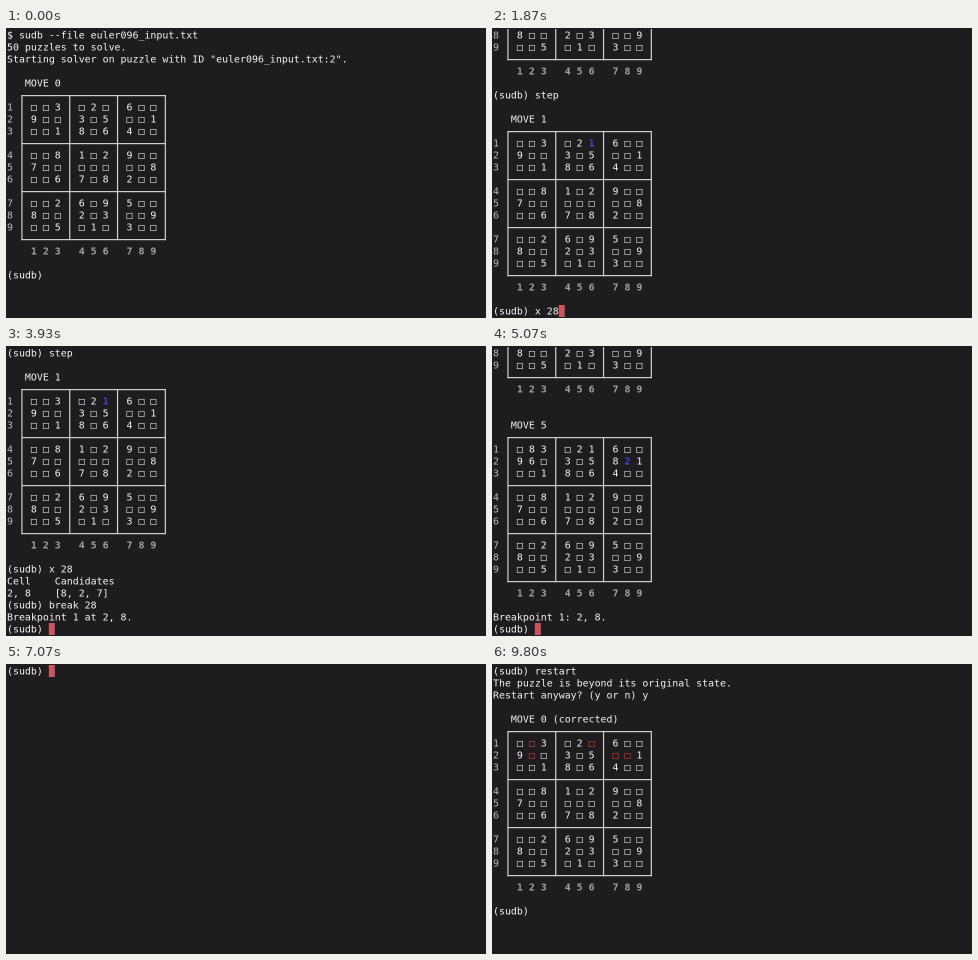
Animation of 480 by 290 pixels, one loop 9.99 s. Source, as an HTML page with a canvas:

```html
<!DOCTYPE html>
<html lang="en">
<head>
<meta charset="utf-8">
<title>Sudoku debugger session</title>
<style>
  html, body { margin: 0; width: 100%; height: 100%; overflow: hidden; background: #1e1c1f; }
  canvas { display: block; }
</style>
</head>
<body>
<canvas id="term" width="480" height="290"></canvas>
<script>
const LOOP = 9990, WIDTH = 480, HEIGHT = 290, ROWS = 24, PAD = 1;
const CELL_W = (WIDTH - 2 * PAD) / 80, CELL_H = (HEIGHT - 2 * PAD) / ROWS;
const BASELINE = 9.46, RULE_WIDTH = 1.2, OVERSAMPLE = 2;
const FONT = '9.92px "DejaVu Sans Mono", monospace';
const COLOR = {
  bg: '#1e1c1f', text: '#f4f4f4', label: '#bcbcbc', axis: '#a2a2a2',
  rule: '#d0d0d0', move: '#4a40d8', undo: '#cc4844', cursor: '#c9565c'
};
const PROMPT = '(sudb) ';
const PUZZLE = [
  '..3.2.6..', '9..3.5..1', '..18.64..',
  '..81.29..', '7.......8', '..67.82..',
  '..26.95..', '8..2.3..9', '..5.1.3..'
];
// Each move is row, column, digit, counted from 1.
const MOVES = [[1, 6, 1], [2, 7, 8], [1, 2, 8], [2, 2, 6], [2, 8, 2]];

const columnOf = i => 4 + 2 * i + 2 * Math.floor(i / 3);
const span = (col, text, color = COLOR.text, bold = false) => ({ col, text, color, bold });
const textLine = text => ({ spans: [span(0, text)] });

// Terminal model: a growing list of lines and timed snapshots of its tail.
let lines = [];
const states = [];

const snap = (time, cursor = true) =>
  states.push({ time, cursor, rows: lines.slice(-ROWS) });
const print = (...texts) => lines.push(...texts.map(textLine));

function type(time, text, prompt = PROMPT) {
  lines[lines.length - 1] = textLine(prompt + text);
  snap(time);
}

function printGrid(title, moveCount, marked, markColor) {
  const cells = PUZZLE.map(row => [...row]);
  MOVES.slice(0, moveCount).forEach(([r, c, digit]) => cells[r - 1][c - 1] = String(digit));
  const isMarked = (r, c) => marked.some(m => m[0] === r + 1 && m[1] === c + 1);

  print('', '   ' + title);
  cells.forEach((row, r) => {
    if (r % 3 === 0) lines.push({ spans: [], rule: r ? 'middle' : 'top' });
    const spans = row.map((cell, c) => {
      const hit = isMarked(r, c);
      const glyph = cell === '.' ? '□' : cell;
      return span(columnOf(c), glyph, hit ? markColor : COLOR.text, hit && cell !== '.');
    });
    lines.push({ spans: [span(0, String(r + 1), COLOR.label), ...spans], rule: 'bars' });
  });
  lines.push({ spans: [], rule: 'bottom' });
  lines.push({ spans: cells.map((_, i) => span(columnOf(i), String(i + 1), COLOR.axis, true)) });
  print('');
}

const printMove = n => printGrid('MOVE ' + n, n, [MOVES[n - 1]], COLOR.move);

function buildSession() {
  print('$ sudb --file euler096_input.txt', '50 puzzles to solve.',
    'Starting solver on puzzle with ID "euler096_input.txt:2".');
  printGrid('MOVE 0', 0, []);
  print(PROMPT);
  snap(0, false);
  snap(70);

  type(200, 's');
  type(470, 'step');
  printMove(1);
  print(PROMPT);
  snap(800);

  type(1130, 'x');
  type(1530, 'x ');
  type(1670, 'x 2');
  type(1800, 'x 28');
  print('Cell    Candidates', '2, 8    [8, 2, 7]', PROMPT);
  snap(2200);

  type(2530, 'b');
  type(2870, 'break ');
  type(3270, 'break 2');
  type(3400, 'break 28');
  print('Breakpoint 1 at 2, 8.', PROMPT);
  snap(3930);

  type(4130, 'f');
  type(4470, 'finish ');
  [2, 3, 4, 5].forEach(printMove);
  print('Breakpoint 1: 2, 8.', PROMPT);
  snap(5000);

  type(5330, 'e');
  type(5600, 'explain ');
  snap(6200, false);
  printMove(5);
  print(PROMPT);
  snap(6270);

  lines = [];
  print(PROMPT);
  snap(7070);

  type(7270, 'r');
  type(7400, 're');
  type(7530, 'res');
  type(7670, 'restart ');
  const question = 'Restart anyway? (y or n) ';
  print('The puzzle is beyond its original state.', question);
  snap(8130);
  type(8470, 'y', question);
  printGrid('MOVE 0 (corrected)', 0, MOVES, COLOR.undo);
  print(PROMPT);
  snap(8930);
  snap(9470, false);
}

// The terminal is drawn oversampled and scaled down for soft edges.
const screen = document.getElementById('term').getContext('2d');
const buffer = document.createElement('canvas');
buffer.width = WIDTH * OVERSAMPLE;
buffer.height = HEIGHT * OVERSAMPLE;
const ctx = buffer.getContext('2d');
ctx.scale(OVERSAMPLE, OVERSAMPLE);

const cellX = col => PAD + col * CELL_W;
const cellY = row => PAD + row * CELL_H;

function drawRule(kind, top) {
  const middle = CELL_H / 2;
  const from = kind === 'top' ? middle : 0;
  const to = kind === 'bottom' ? middle + RULE_WIDTH : CELL_H;
  const barX = i => cellX(2.5 + 8 * i) - RULE_WIDTH / 2;
  ctx.fillStyle = COLOR.rule;
  for (let i = 0; i < 4; i++) ctx.fillRect(barX(i), top + from, RULE_WIDTH, to - from);
  if (kind !== 'bars') ctx.fillRect(barX(0), top + middle, barX(3) - barX(0) + RULE_WIDTH, RULE_WIDTH);
}

function drawSpan({ col, text, color, bold }, top) {
  ctx.font = (bold ? 'bold ' : '') + FONT;
  ctx.fillStyle = color;
  [...text].forEach((ch, i) => {
    if (ch !== ' ') ctx.fillText(ch, cellX(col + i), top + BASELINE);
  });
}

function drawState({ rows, cursor }) {
  ctx.fillStyle = COLOR.bg;
  ctx.fillRect(0, 0, WIDTH, HEIGHT);
  rows.forEach((line, r) => {
    if (line.rule) drawRule(line.rule, cellY(r));
    line.spans.forEach(s => drawSpan(s, cellY(r)));
  });
  if (cursor) {
    const row = rows.length - 1;
    ctx.fillStyle = COLOR.cursor;
    ctx.fillRect(cellX(rows[row].spans[0].text.length), cellY(row), CELL_W, CELL_H);
  }
  screen.drawImage(buffer, 0, 0, WIDTH, HEIGHT);
}

function frame() {
  const time = performance.now() % LOOP;
  drawState(states.filter(s => s.time <= time).pop());
  requestAnimationFrame(frame);
}

buildSession();
frame();
</script>
</body>
</html>
```
